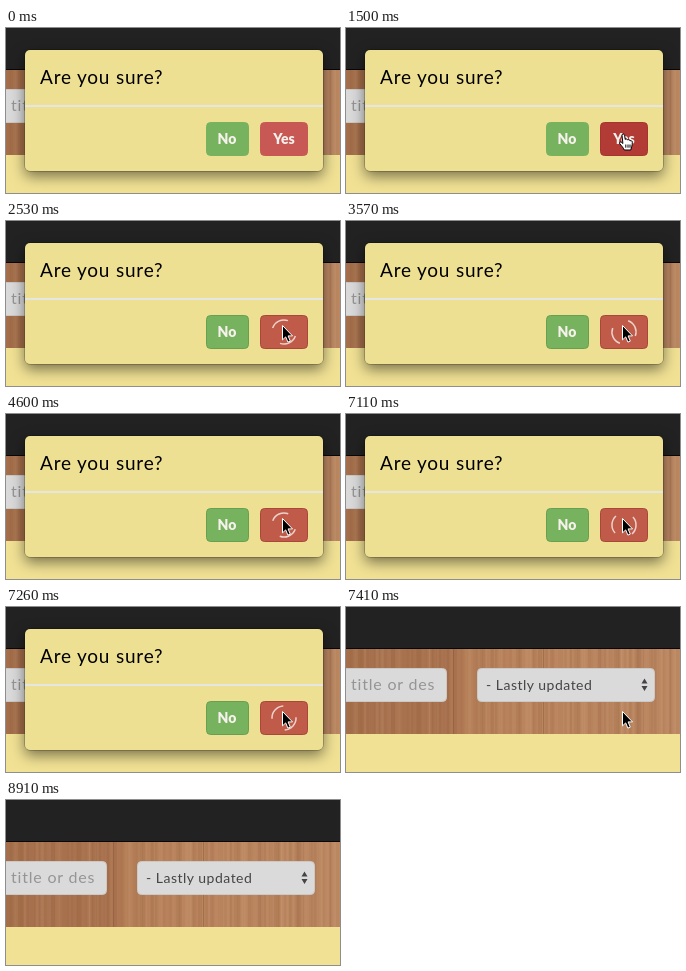
Write an HTML page that moves like this. It is 334 px wide and 165 px high and loops after 9.06 s.

```html
<!DOCTYPE html>
<html lang="en">
<head>
<meta charset="utf-8">
<title>Confirm dialog</title>
<style>
html, body { margin: 0; width: 100%; height: 100%; overflow: hidden; background: #222; }
svg { display: block; width: 334px; height: 165px; }
text { font: 16px "Architects Daughter", Lato, sans-serif; }
.title { font-size: 19px; letter-spacing: .8px; }
.hint { fill: #959595; letter-spacing: .8px; }
.option { font-size: 14px; fill: #444; letter-spacing: .5px; }
.label { font-size: 14px; font-weight: 900; fill: #f6f1ec; text-anchor: middle; }
.field { fill: #dadada; stroke: #cbc9c7; }
#modal { filter: drop-shadow(0 5px 7px rgba(0, 0, 0, .5)); }
</style>
</head>
<body>
<svg viewBox="0 0 334 165">
  <linearGradient id="tone">
    <stop offset="0" stop-color="#a5704d"/>
    <stop offset=".34" stop-color="#aa7350"/>
    <stop offset=".36" stop-color="#b58059"/>
    <stop offset="1" stop-color="#bb8863"/>
  </linearGradient>
  <rect width="334" height="165" fill="#222"/>
  <rect y="41" width="334" height="1" fill="#080808"/>
  <rect y="42" width="334" height="85" fill="url(#tone)"/>
  <g id="wood"></g>
  <rect y="127" width="334" height="38" fill="#f0e194"/>

  <rect class="field" x="-20.5" y="61.5" width="121" height="33" rx="4"/>
  <text class="hint" x="5" y="83">title or des</text>
  <rect class="field" x="131.5" y="61.5" width="177" height="33" rx="4"/>
  <text class="option" x="140" y="82.5">- Lastly updated</text>
  <path d="M295.5 76.5l3-5 3 5zM295.5 79l3 5 3-5z" fill="#444"/>

  <g id="modal">
    <rect x="18.5" y="21.5" width="299" height="122" rx="6" fill="none" stroke="#000" stroke-opacity=".2"/>
    <rect x="19" y="22" width="298" height="121" rx="5" fill="#eee092"/>
    <rect x="19" y="77" width="298" height="2" fill="#e5e5e2"/>
    <text class="title" x="34" y="55.5">Are you sure?</text>
    <rect id="no" x="200.5" y="94.5" width="42" height="33" rx="4" fill="#77b35f"/>
    <text class="label" x="221" y="115.5">No</text>
    <rect id="ring" x="252.5" y="92.5" width="51" height="37" rx="6" fill="none" stroke="#c9302c" stroke-opacity=".25" stroke-width="3"/>
    <rect id="yes" x="254.5" y="94.5" width="47" height="33" rx="4"/>
    <text id="yesLabel" class="label" x="278" y="115.5">Yes</text>
    <path id="spinner" d="M-8.5-8.5A12 12 0 0 0-8.5 8.5M8.5-8.5A12 12 0 0 1 8.5 8.5"
      fill="none" stroke="#ecd3ca" stroke-width="1.5"/>
  </g>

  <path id="arrow" d="M0 0V14.4L3.2 11.4 5.4 16.6 7.8 15.6 5.6 10.4H10Z" fill="#000" stroke="#fff"/>
  <path id="hand" d="M3 1.2C3 -.4 5.4 -.4 5.6 1.2L6.2 5.5C7 4.6 8.4 4.9 8.7 6C9.6 5.3 10.8 5.7 11 6.8C12.2 6.3 13.3 7 13.3 8.3C13.4 11.5 12.4 13 11.8 16H5.2C4.5 13.6 2.3 11.8 .7 9.6C0 8.3 1.6 7.3 2.7 8.4L3.9 9.5ZM6.8 10.5V13.7M9 10.5V13.7M11 10.5V13.7"
    fill="#fff" stroke="#000" transform="translate(273 106)"/>
</svg>
<script>
const LOOP = 9060, PRESS = 2090, CLOSE = 7410, TICK = 147.8;
const el = id => document.getElementById(id);
const show = (id, on) => el(id).setAttribute('visibility', on ? 'visible' : 'hidden');

// Wood grain: soft vertical streaks, then faint plank seams
let seed = 7;
const rnd = () => (seed = seed * 16807 % 2147483647) / 2147483647;
const streak = (x, w, color, alpha) =>
  `<rect x="${x}" y="42" width="${w}" height="85" fill="${color}" fill-opacity="${alpha}"/>`;
let grain = '';
for (let x = 0; x < 334; x += 1 + rnd() * 2)
  grain += streak(x, 1 + rnd() * 3, rnd() > .5 ? '#84512f' : '#d6a882', rnd() * .15);
for (const x of [107, 197]) grain += streak(x, 1, '#70432c', .3);
el('wood').innerHTML = grain;

// Arrow tip by start time; null hides it
const stops = [
  [0, null], [300, [263, 106]], [600, [276, 119]], [1350, null], [2240, [276.5, 104.5]],
  [8460, [278, 113]], [8610, [280, 131]], [8760, [281, 151]], [8910, null]
];

function draw(now) {
  const t = now % LOOP;
  const step = Math.floor((t - PRESS) / TICK + .1);
  const open = t < CLOSE, loading = open && step >= 1;
  const tip = stops.filter(s => s[0] <= t).pop()[1];

  el('modal').style.display = open ? '' : 'none';
  show('ring', step === 0);
  show('yesLabel', !loading);
  show('spinner', loading);
  el('spinner').setAttribute('transform', `translate(278 111) rotate(${(step - 10) * 38.67 - 25})`);

  const fill = t < 1350 ? '#c85854' : t < 1500 ? '#bd4944' : loading ? '#c05a49' : '#b33b36';
  el('yes').setAttribute('fill', fill);
  el('yes').setAttribute('stroke', t < 1350 ? fill : loading ? '#a9483a' : '#a53530');
  el('no').setAttribute('stroke', loading ? '#67a050' : '#77b35f');

  show('hand', t >= 1350 && t < 2240);
  show('arrow', tip);
  if (tip) el('arrow').setAttribute('transform', `translate(${tip})`);
  requestAnimationFrame(() => draw(performance.now() - start));
}
const start = performance.now();
draw(0);
</script>
</body>
</html>
```
